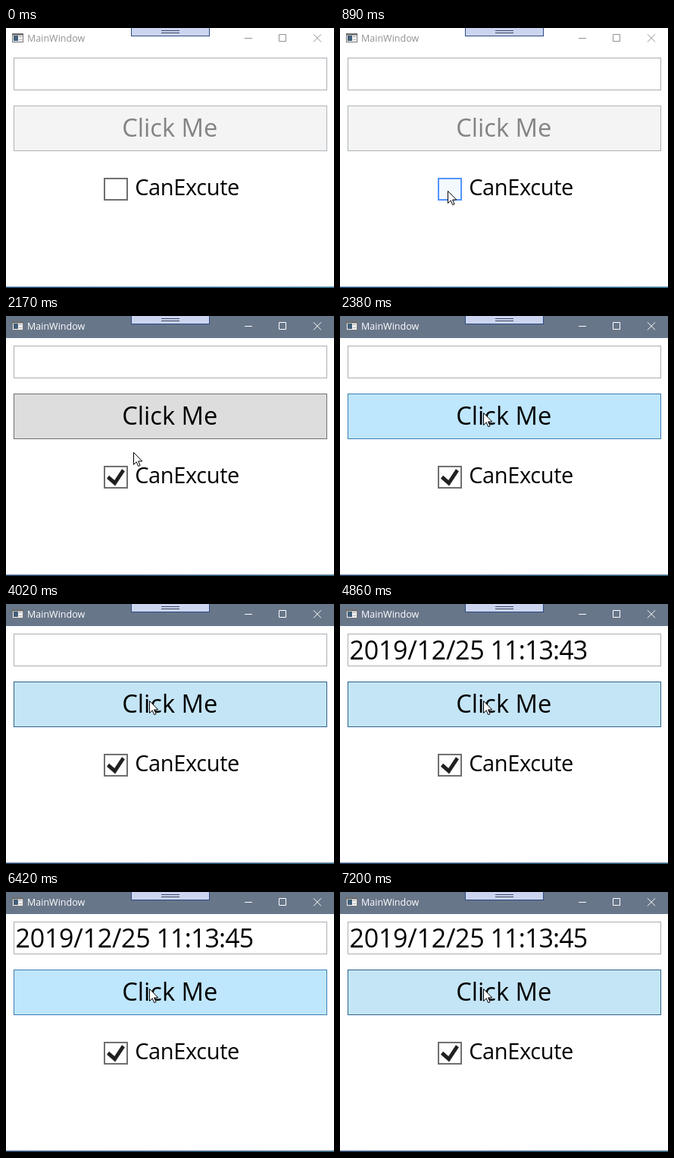
Animation, 433 px wide and 342 px high, one loop 8 s. Source, as an HTML page:

```html
<!DOCTYPE html>
<html lang="en">
<head>
<meta charset="utf-8">
<title>Command demo</title>
<style>
html, body { margin: 0; width: 100%; height: 100%; overflow: hidden; background: #fff; }
svg { display: block; width: 433px; height: 342px; }
text { font-family: "Open Sans", "Noto Sans", sans-serif; white-space: pre; }
</style>
</head>
<body>
<svg viewBox="0 0 433 342">
  <defs>
    <linearGradient id="desk">
      <stop offset="0" stop-color="#1c3f6e"/>
      <stop offset=".6" stop-color="#1d5580"/>
      <stop offset="1" stop-color="#2a6f8c"/>
    </linearGradient>
  </defs>
  <rect width="433" height="342" fill="#fff"/>
  <rect id="bar" width="433" height="29"/>
  <g id="icon">
    <rect x="8.5" y="7.5" width="14" height="11" fill="#f4f4f4" stroke="#777"/>
    <path d="M8 8.5H23" stroke="#666" stroke-width="2"/>
    <rect x="10" y="10" width="6" height="7" fill="#41607c"/>
    <path d="M17 11.5h4M17 15.5h4" stroke="#aaa"/>
  </g>
  <text id="title" x="28" y="18" font-size="12.5">MainWindow</text>
  <path id="caps" d="M315 13.5H325M360.5 8.5h9v9h-9zM406 8.3l10 10M416 8.3l-10 10" fill="none"/>
  <rect x="165.5" y="-.5" width="103" height="11" fill="#ccd5f0" stroke="#2b4a80"/>
  <path d="M205 3.5H229M205 6.5H229" stroke="#3a4560"/>

  <rect x="10.5" y="39.5" width="413" height="42" fill="#fff" stroke="#abadb3"/>
  <g id="stamp" font-size="34">
    <text x="12.5" y="73" letter-spacing="-.25">2019/12/25</text>
    <text id="clock" x="198.5" y="73" letter-spacing="-.85"></text>
  </g>

  <rect id="btn" x="10.5" y="102.5" width="413" height="59"/>
  <text id="label" x="153.2" y="143" font-size="32.7">Click Me</text>

  <rect id="box" x="130" y="198" width="30" height="28" stroke-width="2"/>
  <path id="tick" transform="translate(133 201.3) scale(2.4)" fill="#212121"
    d="M9.97 1.22L4.7 9.1H4.52L0 5.19 1.28 3.52 4.26 6.09 8.33 0z"/>
  <text x="170.2" y="220" font-size="29" letter-spacing="-.37">CanExcute</text>

  <rect id="edge" y="340" width="433" height="1"/>
  <rect y="341" width="433" height="1" fill="url(#desk)"/>
  <path id="cursor" d="M.5 .5V16.5L4.2 12.9L6.7 18.6L9.1 17.6L6.6 12H11.8z"
    fill="#fff" stroke="#000"/>
</svg>
<script>
const LOOP = 8000;
const $ = id => document.getElementById(id);
const set = (id, attrs) => {
  for (const k in attrs) $(id).setAttribute(k, attrs[k]);
};
const show = (id, on) => set(id, { visibility: on ? "visible" : "hidden" });
const skin = (id, [fill, stroke]) => set(id, { fill, stroke });

const BUTTON = {
  disabled: ["#f4f4f4", "#adb2b5"],
  normal: ["#dddddd", "#707070"],
  hover: ["#bee6fd", "#3c7fb1"],
  pressed: ["#c4e5f6", "#2c628b"]
};
const CHECK = {
  normal: ["#ffffff", "#707070"],
  hover: ["#f3f9ff", "#5593ff"],
  pressed: ["#d9ecff", "#3c77dd"]
};
const PRESSES = [[4020, 4330], [4860, 5110], [5640, 5720], [6270, 6420], [7200, 8000]];
const CLOCK = [[4330, 43], [5110, 44], [6420, 45]];
const MOVE = [[2080, 149, 208], [2170, 168, 179], [2230, 179, 152], [2310, 186, 134], [2380, 189, 127]];

const latest = (list, t) => list.filter(e => t >= e[0]).pop();

// The pointer is sampled in short holds, like a screen capture.
function pointer(t) {
  if (t < 210) return null;
  const hop = latest(MOVE, t);
  if (hop) return [hop[1], hop[2]];
  const step = t < 510 ? 0 : Math.min(6, Math.floor((t - 510) / 76) + 1);
  const p = step / 6, e = p * p * (3 - 2 * p);
  return [Math.round(291 - 149 * e), Math.round(340 - 126 * e)];
}

const inside = (p, x0, y0, x1, y1) =>
  p && p[0] >= x0 && p[0] < x1 && p[1] >= y0 && p[1] < y1;

function draw(t) {
  const active = t >= 1760, checked = t >= 1910;
  const p = pointer(t);

  set("bar", { fill: active ? "#687689" : "#fff" });
  set("title", { fill: active ? "#fff" : "#929292" });
  set("caps", { stroke: active ? "#fff" : "#929292" });
  set("edge", { fill: active ? "#687689" : "#6f92ae" });

  const overBox = inside(p, 129, 197, 161, 227);
  const boxDown = t >= 1840 && t < 1910;
  skin("box", CHECK[boxDown ? "pressed" : overBox ? "hover" : "normal"]);
  show("tick", checked);

  const down = PRESSES.some(([a, b]) => t >= a && t < b);
  const over = inside(p, 10, 102, 424, 162);
  skin("btn", BUTTON[!checked ? "disabled" : down ? "pressed" : over ? "hover" : "normal"]);
  set("label", { fill: checked ? "#000" : "#838383" });

  const now = latest(CLOCK, t);
  show("stamp", !!now);
  $("clock").textContent = now ? "11:13:" + now[1] : "";

  show("cursor", !!p);
  if (p) set("cursor", { transform: `translate(${p[0]} ${p[1]})` });
}

const start = performance.now();
function tick() {
  draw((performance.now() - start) % LOOP);
  requestAnimationFrame(tick);
}
draw(0);
requestAnimationFrame(tick);
</script>
</body>
</html>
```
